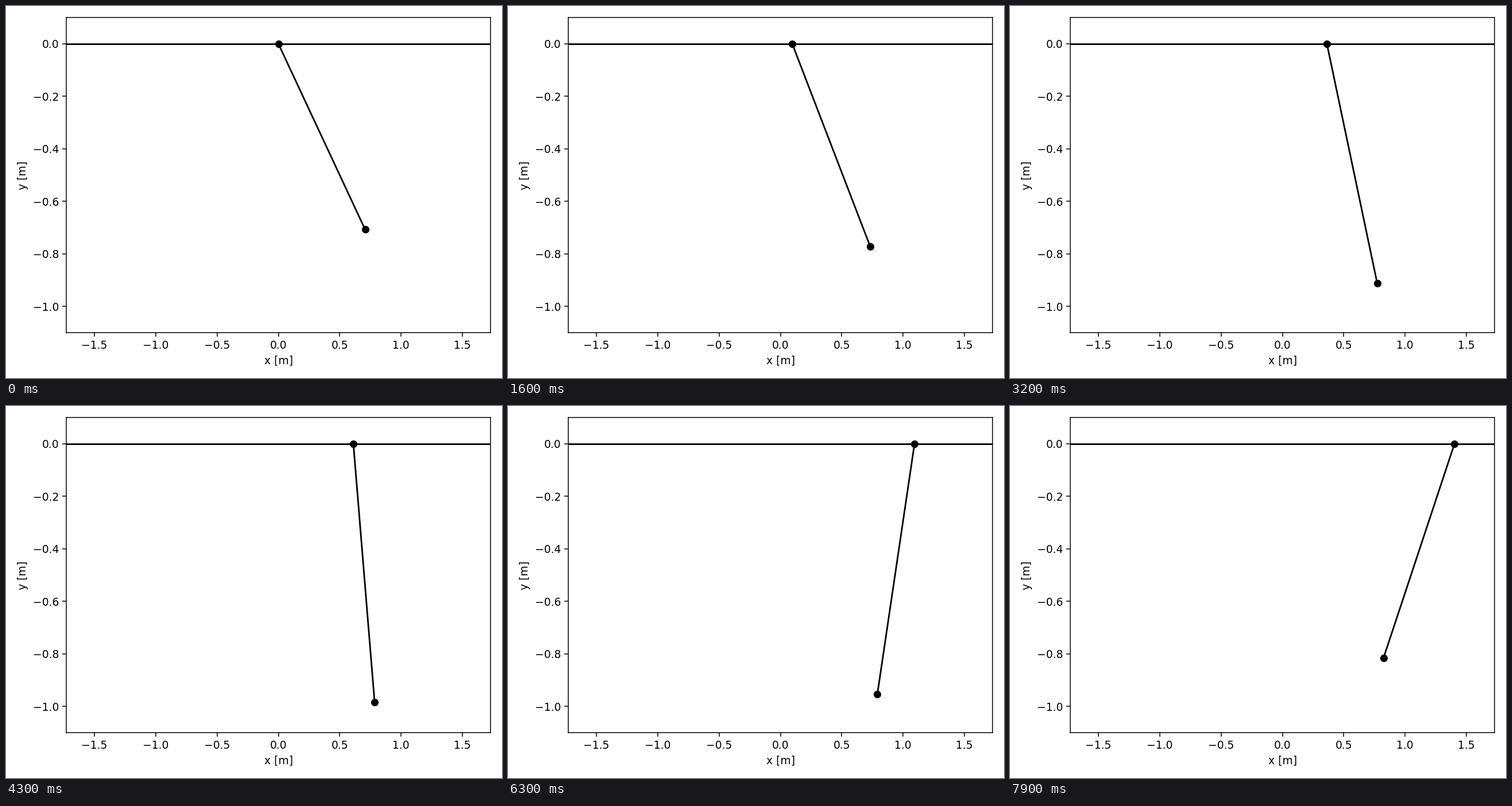
Recreate the animation shown at these times as a matplotlib script. Size 864 by 648 pixels, loop 8000 ms.

```python
import numpy as np
import matplotlib.pyplot as plt
from matplotlib.animation import FuncAnimation

FRAMES = 80
INTERVAL = 100      # ms
DT = 0.01           # simulated seconds per frame
G, LENGTH = 9.81, 1.0
AMPLITUDE = np.pi / 4
OMEGA = np.sqrt(G / LENGTH)

fig, ax = plt.subplots(figsize=(6.4, 4.8), dpi=135)
ax.set_xlim(-1.1 * np.pi / 2, 1.1 * np.pi / 2)
ax.set_ylim(-1.1, 0.1)
ax.set_xlabel("x [m]")
ax.set_ylabel("y [m]")
ax.axhline(0, color="black")
rod, = ax.plot([], [], "o-", color="black")
fig.tight_layout()


def update(frame):
    theta = AMPLITUDE * np.cos(OMEGA * frame * DT)
    # the pivot slides as the pendulum swings back
    pivot = AMPLITUDE - theta
    rod.set_data([pivot, pivot + LENGTH * np.sin(theta)],
                 [0, -LENGTH * np.cos(theta)])
    return rod,


anim = FuncAnimation(fig, update, frames=FRAMES, interval=INTERVAL,
                     repeat=True, repeat_delay=0)
plt.show()
```
